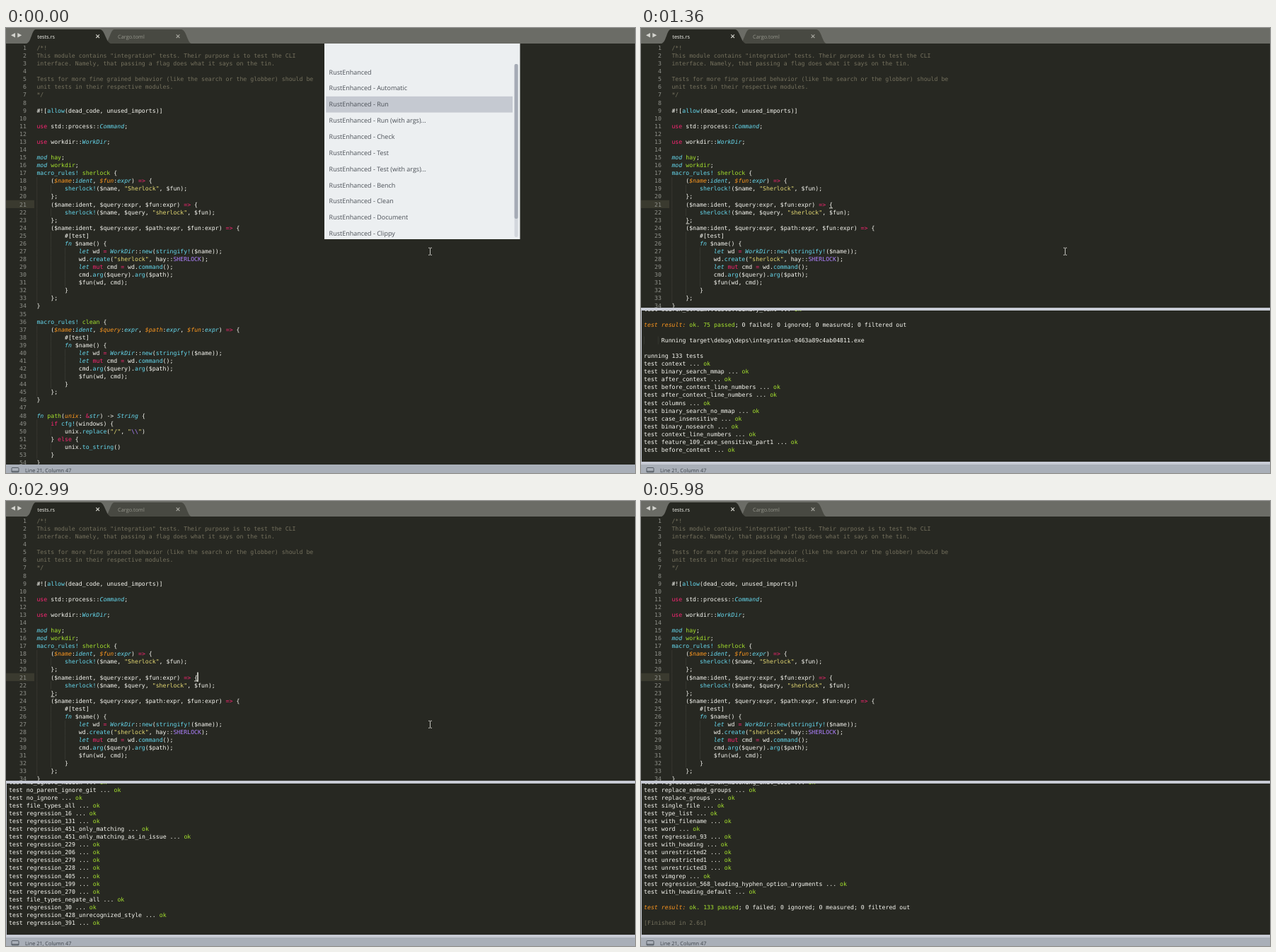
Animation of 889 by 630 pixels, one loop 6400 ms. Source, as an HTML page:

```html
<!DOCTYPE html>
<html lang="en">
<head>
<meta charset="utf-8">
<title>Build output</title>
<style>
html, body { margin: 0; width: 100%; height: 100%; overflow: hidden; background: #272822; }
svg { display: block; }
text { white-space: pre; text-rendering: geometricPrecision; }
.mono { font: 8.22px "DejaVu Sans Mono", monospace; fill: #f8f8f2; }
.ui { font: 7.35px "Open Sans", sans-serif; }
.item { font: 9px "Open Sans", sans-serif; fill: #4a4f56; }
.num { fill: #8f908a; text-anchor: end; }
.comment { fill: #75715e; }
.key { fill: #f92672; }
.type { fill: #66d9ef; font-style: italic; }
.call { fill: #66d9ef; }
.name { fill: #a6e22e; }
.param { fill: #fd971f; font-style: italic; }
.str { fill: #e6db74; }
.const { fill: #ae81ff; }
</style>
</head>
<body>
<svg id="stage" width="889" height="630" viewBox="0 0 889 630">
  <defs>
    <clipPath id="editClip"><rect y="22" width="889" height="596"/></clipPath>
    <clipPath id="outClip"><rect y="400" width="889" height="204"/></clipPath>
    <clipPath id="listClip"><rect x="450" y="50" width="277" height="249"/></clipPath>
  </defs>
  <rect width="889" height="630" fill="#272822"/>

  <g id="editor" clip-path="url(#editClip)">
    <rect y="243.8" width="40" height="11.2" fill="#3a3a2f"/>
    <g id="code" class="mono"></g>
    <g id="brackets" fill="#d8d8d0">
      <rect x="266" y="254.4" width="5" height="1"/>
      <rect x="63.6" y="276.5" width="5" height="1"/>
    </g>
    <rect id="caret" x="270.3" y="242.5" width="1.4" height="13.3" fill="#f8f8f0"/>
  </g>

  <g id="tabs">
    <rect width="889" height="22" fill="#6b6c66"/>
    <path d="M140 22C146 20 147 3 153 2H248C255 3 256 20 262 22Z" fill="#484942"/>
    <path d="M29 22C36 20 36 3 42 2H133C140 3 141 20 148 22Z" fill="#272822"/>
    <path d="M13 7V13.6L7 10.3ZM16.3 7V13.6L22.3 10.3Z" fill="#d3d3ce"/>
    <path d="M127.3 9.3L132 14M132 9.3L127.3 14" stroke="#d0d0c8" stroke-width="1.1"/>
    <path d="M240.7 9.3L245.4 14M245.4 9.3L240.7 14" stroke="#a5a59d" stroke-width="1.1"/>
    <text class="ui" x="44.3" y="14.5" fill="#f4f4ee">tests.rs</text>
    <text class="ui" x="158" y="14.5" fill="#95968c">Cargo.toml</text>
  </g>

  <g id="panel">
    <rect y="396" width="889" height="222" fill="#c8cbd5"/>
    <rect x="1" y="400" width="888" height="214" fill="#272822"/>
    <g clip-path="url(#outClip)"><g id="output" class="mono"></g></g>
  </g>

  <rect y="618" width="889" height="12" fill="#a9afb8"/>
  <rect x="8" y="622.5" width="10" height="6.5" rx="1" fill="none" stroke="#535a62"/>
  <path d="M8 627.5H18" stroke="#535a62"/>
  <text class="ui" x="27" y="628.6" fill="#3d434a">Line 21, Column 47</text>

  <g id="palette">
    <rect x="450" y="22" width="276.5" height="277" fill="#eceff1"/>
    <rect id="input" x="454" y="27.5" width="262" height="20.5" fill="#fff"/>
    <rect id="inputCaret" x="456.3" y="28" width="1.3" height="18" fill="#111"/>
    <rect id="pick" x="452.3" width="263.7" height="22.8" fill="#c5c9d1"/>
    <g id="items" class="item" clip-path="url(#listClip)"></g>
    <rect x="718.6" y="51" width="5" height="245" rx="2" fill="#d2d6dc"/>
    <rect x="718.6" y="51" width="5" height="219" rx="2" fill="#a5abb5"/>
  </g>

  <path id="beam" d="M-2.5 -5H-.7L0 -4.4L.7 -5H2.5M0 -4.4V4.4M-2.5 5H-.7L0 4.4L.7 5H2.5" fill="none" stroke="#d4d4ce" stroke-width=".9"/>
  <path id="arrow" d="M0 0V11L2.6 8.7L4.3 12.6L6 11.9L4.3 8H8Z" fill="#fff" stroke="#222" stroke-width=".7"/>
</svg>
<script>
const LOOP = 6400, LINE = 11.075, ROW = 22.86, CELL = 4.948;
const $ = id => document.getElementById(id);

function add(parent, tag, attrs, text) {
  const el = document.createElementNS("http://www.w3.org/2000/svg", tag);
  for (const k in attrs) el.setAttribute(k, attrs[k]);
  if (text !== undefined) el.textContent = text;
  parent.append(el);
  return el;
}

// Splits a line into coloured spans; each named group is a class.
function paint(parent, line, x, y, rules) {
  const text = add(parent, "text", { x, y });
  let pos = 0;
  for (const m of line.matchAll(rules)) {
    const kind = Object.keys(m.groups).find(k => m.groups[k] !== undefined);
    text.append(line.slice(pos, m.index));
    add(text, "tspan", { class: kind }, m[0]);
    pos = m.index + m[0].length;
  }
  text.append(line.slice(pos));
}

function guides(parent, line, x, y) {
  const indent = line.search(/\S/);
  for (let col = 0; col < indent; col += 4)
    add(parent, "rect", { x: x + col * CELL, y: y - 8.3, width: .8, height: LINE, fill: "#3a3b34" });
}

const code = String.raw`/*!
This module contains "integration" tests. Their purpose is to test the CLI
interface. Namely, that passing a flag does what it says on the tin.

Tests for more fine grained behavior (like the search or the globber) should be
unit tests in their respective modules.
*/

#![allow(dead_code, unused_imports)]

use std::process::Command;

use workdir::WorkDir;

mod hay;
mod workdir;
macro_rules! sherlock {
    ($name:ident, $fun:expr) => {
        sherlock!($name, "Sherlock", $fun);
    };
    ($name:ident, $query:expr, $fun:expr) => {
        sherlock!($name, $query, "sherlock", $fun);
    };
    ($name:ident, $query:expr, $path:expr, $fun:expr) => {
        #[test]
        fn $name() {
            let wd = WorkDir::new(stringify!($name));
            wd.create("sherlock", hay::SHERLOCK);
            let mut cmd = wd.command();
            cmd.arg($query).arg($path);
            $fun(wd, cmd);
        }
    };
}

macro_rules! clean {
    ($name:ident, $query:expr, $path:expr, $fun:expr) => {
        #[test]
        fn $name() {
            let wd = WorkDir::new(stringify!($name));
            let mut cmd = wd.command();
            cmd.arg($query).arg($path);
            $fun(wd, cmd);
        }
    };
}

fn path(unix: &str) -> String {
    if cfg!(windows) {
        unix.replace("/", "\\")
    } else {
        unix.to_string()
    }
}`.split("\n");

const comment = /(?<comment>.+)/g;
const base = String.raw`(?<str>"[\w\/]+"|")|(?<const>\\+|\b[A-Z]{2,}\b)|(?<name>(?<=\b(?:mod|fn|macro_rules!) )\w+)`
  + String.raw`|(?<key>\b(?:use|if|else|mut)\b|=>|&|(?<= )=(?= ))|(?<call>\b\w+!(?=[ (])|(?<![$\w])[a-z]\w*(?=\())`;
const types = String.raw`\b(?:let|fn|mod|str)\b|\b[A-Z][a-z]\w+`;
const rust = RegExp(base + `|(?<type>${types})|(?<param>unix(?=: ))`, "g");
const pattern = RegExp(base + String.raw`|(?<type>${types}|(?<=:)(?:ident|expr))|(?<param>\$\w+(?=:))`, "g");

code.forEach((line, i) => {
  const n = i + 1, y = 31 + i * LINE;
  add($("code"), "text", { x: 29, y, class: "num" }, n);
  guides($("code"), line, 43.4, y);
  paint($("code"), line, 43.4, y, n < 8 ? comment : n === 18 || n === 37 ? pattern : rust);
});

const words = s => s.trim().split(/\s+/);
const prefixed = (head, s) => words(s).map(w => head + w);

const unit = [
  ...prefixed("decoder::tests::", "peeker_empty peeker_one peeker_two peeker_three bom_none bom_utf8 bom_utf16le trans_simple"),
  ...prefixed("search_buffer::tests::", `basic_search binary binary_text count invert_match
    invert_line_count line_numbers max_matches quiet files_match`),
  ...prefixed("search_stream::tests::after_context_", "one1 two1 two2 two3 invert_one1 invert_one2"),
  ...prefixed("search_stream::tests::before_context_", "one1 one2 two1 two2 two3 two4"),
  ...prefixed("search_stream::tests::", "basic_search1 binary invert_match count line_numbers binary_text")
];

const tests = words(`context binary_search_mmap after_context before_context_line_numbers
  after_context_line_numbers columns binary_search_no_mmap case_insensitive binary_nosearch
  context_line_numbers feature_109_case_sensitive_part1 before_context
  feature_109_case_sensitive_part2 count feature_129_matches feature_159_works feature_129_context
  feature_159_zero_max feature_129_replace feature_1_unknown_encoding feature_1_utf16_auto
  feature_1_eucjp feature_1_utf16_explicit feature_196_persistent_config
  feature_362_dfa_size_limit feature_45_relative_cwd feature_362_exceeds_regex_size_limit feature_263_sort_reverse
  feature_1_sjis feature_263_sort_files feature_275_pathsep feature_419_zero_as_shortcut_for_null
  feature_20_no_filename feature_68_no_ignore_vcs feature_34_only_matching_line_column
  feature_45_precedence_with_others feature_34_only_matching feature_45_precedence_internal
  feature_243_column_line feature_7 file_type_clear feature_7_dash feature_89_files feature_89_match
  feature_89_files_with_matches file_types
  feature_89_count file_type_add glob feature_89_files_without_matches files_with_matches
  file_type_add_compose glob_negate files_without_matches iglob ignore_generic ignore_git
  ignore_hidden ignore_git_parent ignore_ripgrep ignore_git_parent_stop inverted line_numbers
  inverted_line_numbers literal max_filesize_parse_error_length max_filesize_parse_error_suffix
  max_filesize_parse_k_suffix max_filesize_parse_m_suffix max_filesize_parse_no_suffix
  max_filesize_suffix_overflow file_types_negate no_ignore_hidden
  no_parent_ignore_git no_ignore file_types_all regression_16 regression_131
  regression_451_only_matching regression_451_only_matching_as_in_issue regression_229
  regression_206 regression_279 regression_228 regression_405 regression_199 regression_270
  file_types_negate_all regression_30 regression_428_unrecognized_style regression_391
  regression_105_part1 regression_105_part2 regression_127 regression_128 regression_156
  regression_184 regression_210 regression_25 regression_251 regression_256 regression_256_j1
  regression_428_color_context_path regression_483_matching_no_stdout regression_49 regression_50
  regression_64 regression_65 regression_67 regression_87 regression_90 regression_99 quiet replace
  symlink_follow symlink_nofollow replace_with_only_matching vimgrep_no_line
  regression_483_non_matching_exit_code
  replace_named_groups replace_groups single_file type_list with_filename word regression_93
  with_heading unrestricted2 unrestricted1 unrestricted3 vimgrep
  regression_568_leading_hyphen_option_arguments with_heading_default`);

const passed = name => `test ${name} ... ok`;
const result = n => `test result: ok. ${n} passed; 0 failed; 0 ignored; 0 measured; 0 filtered out`;
const log = [
  ...unit.map(passed), "", result(75), "",
  "     Running target\\debug\\deps\\integration-0463a89c4ab04811.exe", "",
  "running 133 tests", ...tests.map(passed), "", result(133), "", "[Finished in 2.6s]"
];
const logRules = /(?<param>test result:)|(?<name>\bok\b\.?|\d+ passed)|(?<comment>\[Fin.*)/g;
log.forEach((line, i) => {
  const y = i * LINE;
  guides($("output"), line, 4, y);
  paint($("output"), line, 4, y, logRules);
});

["", " - Automatic", " - Run", " - Run (with args)...", " - Check", " - Test", " - Test (with args)...",
  " - Bench", " - Clean", " - Document", " - Clippy"].forEach((s, i) =>
  add($("items"), "text", { x: 456.6, y: 65.6 + i * ROW }, "RustEnhanced" + s));

// Keyed steps: [time, value], held until the next one.
const step = (keys, t) => keys.findLast(k => k[0] <= t)[1];
const picks = [[0, 2], [270, 3], [400, 4], [540, 5]];
const head = unit.length + 6;
const shown = [[0, 0], [1070, 18], [1210, 36],
  ...[[1360, 12], [1480, 17], [1630, 26], [1820, 33], [1940, 40], [2090, 46], [2240, 54], [2390, 62],
    [2670, 70], [2860, 82], [2990, 91], [3120, 101], [3250, 112], [3370, 124], [3500, 137]]
    .map(([t, n]) => [t, head + n])];
const blink = [[0, 0], [800, 1], [1210, .5], [1360, 0], [1820, .5], [1940, 1], [2240, .5], [2390, 0],
  [2860, .5], [2990, 1], [3250, .5], [3370, 0], [3890, .5], [4020, 1], [4280, .5], [4410, 0],
  [4840, .5], [4970, 1], [5120, .5], [5250, 0]];
const beam = [[0, [599.5, 316.3]], [4690, [435.6, 543.6]], [4840, [435.6, 596]], [4970, null],
  [5540, [565, 590.5]], [5670, null]];
const arrow = [[0, null], [5670, [655.5, 615.3]], [5820, [753.4, 629]], [5980, null]];

const show = (id, on) => $(id).setAttribute("display", on ? "inline" : "none");
function place(id, p) {
  show(id, p);
  if (p) $(id).setAttribute("transform", `translate(${p})`);
}

function draw(t) {
  const open = t < 800, count = step(shown, t);
  show("palette", open);
  show("input", t >= 140);
  show("inputCaret", t >= 140);
  $("pick").setAttribute("y", 51.1 + step(picks, t) * ROW);
  show("panel", !open);
  show("brackets", !open && t < 5120);
  $("caret").setAttribute("opacity", step(blink, t));
  place("output", count ? [0, 600 - (count - 1) * LINE] : null);
  place("beam", step(beam, t));
  place("arrow", step(arrow, t));
}

const start = performance.now();
function tick() {
  draw((performance.now() - start) % LOOP);
  requestAnimationFrame(tick);
}
tick();
</script>
</body>
</html>
```
